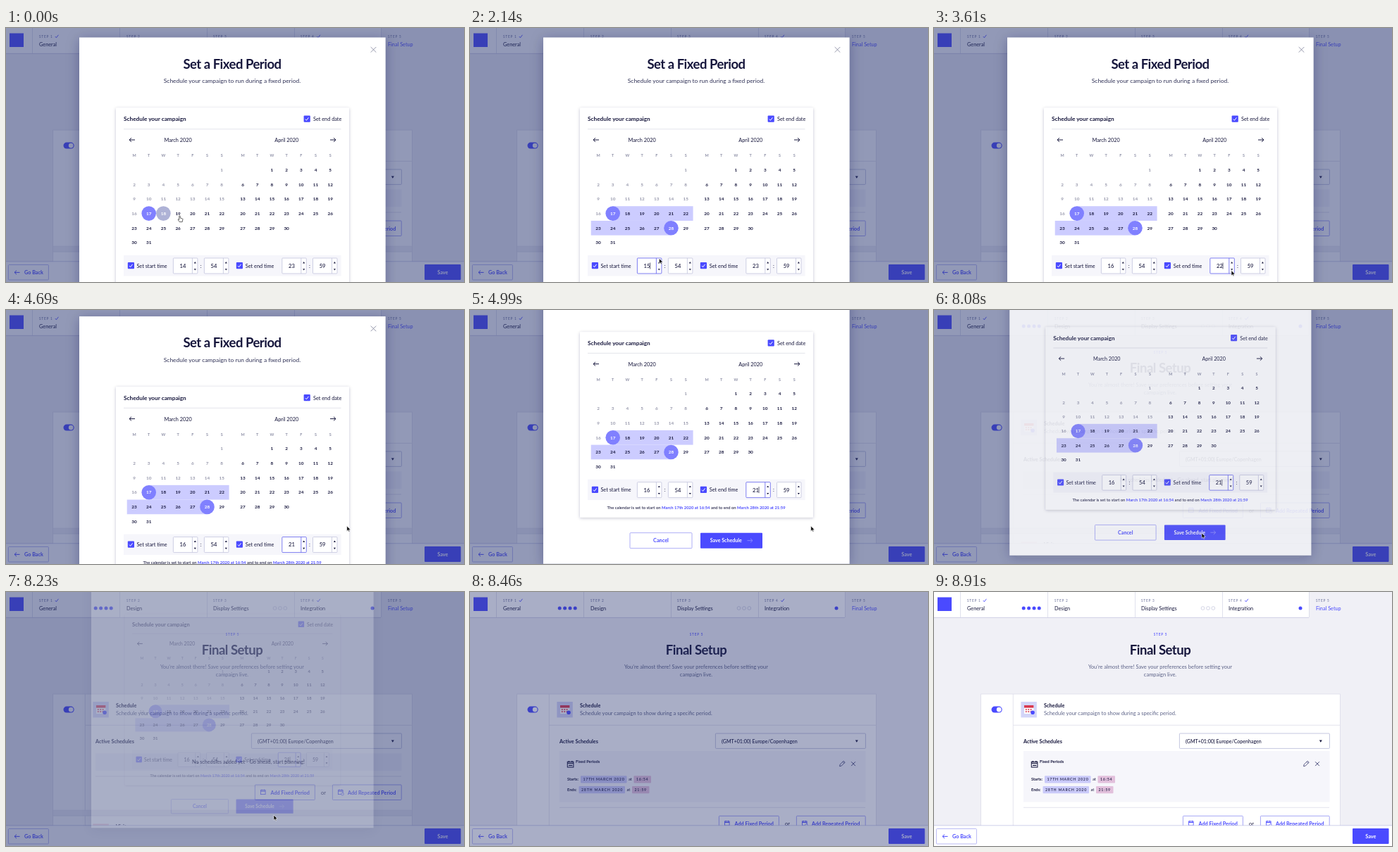
These frames come from a looping animation (650x361 px, 8980 ms). An HTML page:

```html
<!DOCTYPE html>
<html lang="en">
<head>
<meta charset="utf-8">
<title>Schedule a campaign</title>
<style>
  html, body { margin: 0; width: 100%; height: 100%; overflow: hidden; background: #f0f0f6; }
  svg { display: block; width: 650px; height: 361px; font-family: Lato, "Open Sans", sans-serif; }
</style>
</head>
<body>
<svg id="stage" viewBox="0 0 650 361"></svg>
<script>
const LOOP = 8980, BLUE = '#4a4aff', INK = '#16163c', GREY = '#9697ab', SOFT = '#5d6388';
const CELL = 20.7, MAX_SCROLL = 91;

// ---- drawing helpers ----
// y is the vertical middle of the capitals
const text = (x, y, s, { size = 7.3, w = 400, fill = INK, at = 'start', ls = 0 } = {}) =>
  `<text x="${x}" y="${y + size * .36}" font-size="${size}" font-weight="${w}" fill="${fill}" text-anchor="${at}" letter-spacing="${ls}">${s}</text>`;
const mid = (x, y, s, o = {}) => text(x, y, s, { ...o, at: 'middle' });
const bold = (x, y, s, o = {}) => text(x, y, s, { size: 7.25, w: 700, ...o });
const rect = (x, y, w, h, fill, stroke = 'none', rx = 0) =>
  `<rect x="${x}" y="${y}" width="${w}" height="${h}" fill="${fill}" stroke="${stroke}" stroke-width=".8" rx="${rx}"/>`;
const line = (d, stroke, w = .8) => `<path d="${d}" fill="none" stroke="${stroke}" stroke-width="${w}"/>`;
const shape = (d, fill) => `<path d="${d}" fill="${fill}"/>`;
const dot = (x, y, r, fill, stroke = 'none') =>
  `<circle cx="${x}" cy="${y}" r="${r}" fill="${fill}" stroke="${stroke}" stroke-width=".6"/>`;
const arrow = (x, y, dir, color, len = 8) =>
  line(`M${x} ${y}h${dir * len}m${-dir * 3} -2.8l${dir * 3} 2.8l${-dir * 3} 2.8`, color, 1);
const cross = (x, y, r, color) => line(`M${x - r} ${y - r}l${2 * r} ${2 * r}m0 ${-2 * r}l${-2 * r} ${2 * r}`, color, .9);
const tick = (x, y, color, w = 1) => line(`M${x - 2.2} ${y}l1.6 1.8l3 -4`, color, w);
const checkbox = (x, y) => rect(x, y, 9.2, 9.2, BLUE, 'none', 1) + tick(x + 4.4, y + 5, '#fff');
const step = (x, y, n, fill, at) => text(x, y, `STEP ${n}`, { size: 4.7, w: 500, fill, at, ls: .8 });
const shadow = (id, blur, dy, opacity) =>
  `<filter id="${id}" x="-20%" y="-20%" width="140%" height="140%"><feDropShadow dx="0" dy="${dy}" stdDeviation="${blur}" flood-color="#20204a" flood-opacity="${opacity}"/></filter>`;

// ---- page ----
function header() {
  const names = ['General', 'Design', 'Display Settings', 'Integration', 'Final Setup'];
  const lefts = [47, 171, 294, 418, 542];
  return rect(0, 0, 532, 36, '#fff') + line('M0 36.4H532', '#c9cae2') +
    [37.5, 161.5, 285.5, 409.5, 532.5].map(x => line(`M${x} 0V36`, '#d9dae9')).join('') +
    rect(5, 7.5, 20, 19.5, BLUE) +
    names.map((s, i) => step(lefts[i], 12, i + 1, '#7278a0') + text(lefts[i], 23, s, { fill: i == 4 ? BLUE : INK })).join('') +
    tick(72, 12, BLUE, .9) + tick(443.5, 12, BLUE, .9) +
    [127.2, 134.6, 142, 149.2, 520].map(x => dot(x, 23, 2.5, BLUE)).join('') +
    [381.5, 389, 396.3].map(x => dot(x, 23, 2.4, '#fff', '#b9bbd6')).join('');
}

function footer() {
  return rect(0, 332, 650, 29, '#fff') + line('M0 331.8H650', '#c5c6e6') +
    rect(3.4, 336.5, 57, 21.5, '#fff', '#a9aaf2', 1) + arrow(19.5, 347.4, -1, BLUE, 7.5) +
    bold(26, 347.4, 'Go Back', { fill: BLUE }) +
    rect(594, 336, 51.5, 22, BLUE, 'none', 1) + mid(619.8, 347.4, 'Save', { w: 700, fill: '#fff' });
}

function smallCalendar(x, y, color) {
  return rect(x, y + 1, 6.6, 6, 'none', color) + line(`M${x} ${y + 2.6}h6.6m-5 -2.6v1.6m3.4 -1.6v1.6`, color, 1);
}

function pageButtons() {
  return line('M127 262H561', '#dcdde9') +
    rect(353.4, 274, 85, 21.5, '#fff', '#8f90f4', 1) + rect(463.4, 274, 97.8, 21.5, '#fff', '#8f90f4', 1) +
    smallCalendar(361.5, 280.6, BLUE) + smallCalendar(471.5, 280.6, BLUE) + dot(477.5, 287.2, 1.8, '#fff', BLUE) +
    bold(375.5, 285, 'Add Fixed Period', { fill: BLUE }) + bold(485, 285, 'Add Repeated Period', { fill: BLUE }) +
    mid(450.5, 285, 'or') +
    line('M67 310.3H576', '#dcdde9') + rect(67, 310.5, 509, 7.5, '#f0f0f6') + line('M67 318H576', '#dcdde9') +
    rect(123.4, 329.5, 22.4, 22.4, '#f3cfdc') + bold(156, 333, 'Visitors');
}

function periodRow(y, label, x, date, time) {
  const tag = { size: 5.3, w: 500, ls: .75 };
  return bold(138, y, label, { size: 5.6 }) + rect(x, y - 5, 65.5, 10.2, '#cacaf9', 'none', 1) + text(x + 3.5, y, date, tag) +
    text(x + 68, y, 'at', { size: 5.8 }) + rect(x + 75.5, y - 5, 24.5, 10.2, '#e2c0dc', 'none', 1) + text(x + 79, y, time, tag);
}

function page() {
  const red = '#d8384f';
  return rect(0, 0, 650, 361, '#f0f0f6') +
    step(321.5, 60.8, 5, BLUE, 'middle') +
    mid(321, 82, 'Final Setup', { size: 18.5, w: 700, ls: -.5 }) +
    mid(321, 106, 'You’re almost there! Save your preferences before setting your', { size: 7.5, fill: SOFT }) +
    mid(321, 117.5, 'campaign live.', { size: 7.5, fill: SOFT }) +
    rect(66.6, 145, 509.8, 260, '#fff', '#dcdde9') + line('M112.3 145V361M112.3 189.3H576', '#dcdde9') +
    rect(81.5, 162.6, 15.2, 9, BLUE, 'none', 4.5) + dot(92.2, 167.1, 3.4, '#fff') +
    rect(123.4, 156, 22.4, 22.4, '#d3d5f8') + rect(128, 161, 13.4, 12, '#fff') + rect(128, 161, 13.4, 3.6, red) +
    [0, 1, 2, 3, 4, 5].map(i => rect(129.8 + i % 3 * 3.4, 166.3 + (i > 2) * 3, 2, 1.6, red)).join('') +
    dot(140, 171.3, 2.8, BLUE) +
    bold(156, 161.5, 'Schedule') +
    text(156, 172.3, 'Schedule your campaign to show during a specific period.', { size: 7.5, fill: SOFT }) +
    bold(127, 212, 'Active Schedules') +
    rect(348.4, 201, 213, 21.4, '#fff', '#b7b9d8', 1) + text(357, 212, '(GMT+01:00) Europe/Copenhagen', { size: 7.05, w: 500 }) +
    shape('M546.8 210.4h4l-2 3.4z', INK) +
    `<g id="empty">${rect(127, 229.5, 434.5, 24.5, '#f6f6fb')}${mid(344, 241.6, 'No schedules added yet - Go ahead, start planning!', { size: 7.2 })}</g>` +
    `<g id="added">${rect(127, 226, 434.5, 72.5, '#f6f6fb')}` +
      `<g transform="translate(-40.6 -44) scale(1.3)">${smallCalendar(137.6, 218.4, INK)}${line('M139 223.4h4', INK, 1)}</g>` +
      bold(150, 241.3, 'Fixed Periods', { size: 5.7 }) +
      line('M524.6 247.7l.6 -2.6l5 -5l2 2l-5 5zM529 241.4l2 2', '#34376b') + cross(544, 244.2, 2.9, '#34376b') +
      periodRow(266.2, 'Starts:', 157, '17TH MARCH 2020', '16:54') + periodRow(281, 'Ends:', 154.5, '28TH MARCH 2020', '21:59') +
    '</g>' +
    `<g id="below">${pageButtons()}</g>` + header() + footer();
}

// ---- modal ----
const WEEK = [...'MTWTFSS'];
const cellAt = (x0, first, day) => {
  const i = day + first - 1;
  return [x0 + CELL * (i % 7), 201.5 + CELL * Math.floor(i / 7)];
};

function month(x0, first, count, colorOf) {
  return Array.from({ length: count }, (_, i) =>
    mid(...cellAt(x0, first, i + 1), i + 1, { size: 6.4, w: 700, fill: colorOf(i + 1) })).join('');
}

function march(end, chosen) {
  const half = CELL / 2, at = d => cellAt(182, 6, d);
  const bar = (a, b, y) => rect(a, y - half, b - a, CELL, '#ccccff');
  const [x, y] = at(end), [sx, sy] = at(17);
  let back = '';
  if (end > 22) back = bar(sx, 316.6, sy) + bar(171.7, x, y);
  else if (end > 18) back = bar(sx, x, sy);
  return back + dot(sx, sy, 10.3, '#8080ff') + dot(x, y, 10.3, chosen ? '#8080ff' : '#aeb2d6') +
    month(182, 6, 31, d => d == 17 || d == end ? '#fff' : d < 17 ? GREY : INK);
}

function input(i, x) {
  return `<g id="in${i}" stroke="#c3c5dd">${rect(x, 327, 34.5, 22, '#fff', 'inherit', 1)}<path d="M${x + 27} 327v22" stroke-width=".8"/></g>` +
    shape(`M${x + 29.4} 334.4h3l-1.5 -2.4zM${x + 29.4} 342.2h3l-1.5 2.4z`, INK) +
    `<text id="num${i}" x="${x + 13.6}" y="340.9" font-size="7.6" font-weight="500" text-anchor="middle" fill="${INK}"></text>`;
}

function modal() {
  const heads = x0 => WEEK.map((s, i) => mid(x0 + CELL * i, 181, s, { size: 5.5, w: 700, fill: '#8d8fa6' })).join('');
  return `<g filter="url(#glow)">${rect(104, 13.5, 434.6, 429.5, '#fff')}</g>` + cross(521.5, 30.8, 3.8, '#8b8da3') +
    mid(321, 51, 'Set a Fixed Period', { size: 18.5, w: 700, ls: -.5 }) +
    mid(321, 75, 'Schedule your campaign to run during a fixed period.', { size: 8.45, fill: '#2f3156' }) +
    `<g filter="url(#lift)">${rect(156, 113.5, 331, 263.5, '#fff', 'none', 1)}</g>` +
    bold(167, 129.5, 'Schedule your campaign', { size: 8.25 }) +
    checkbox(422.6, 124.5) + text(436, 129.5, 'Set end date') + line('M167 143.7H475.5', '#dcdde6') +
    arrow(183, 159, -1, INK) + arrow(460, 159, 1, INK) + mid(244.1, 159.5, 'March 2020') + mid(398.3, 159.5, 'April 2020') +
    heads(182) + heads(336) + '<g id="march"></g>' + month(336, 2, 30, () => INK) +
    rect(167, 323, 308.5, 29.5, '#f6f6fb') +
    checkbox(172.8, 333) + text(185.4, 338, 'Set start time') + checkbox(326.8, 333) + text(339.8, 338, 'Set end time') +
    [237.4, 281.4, 391.8, 435.5].map((x, i) => input(i, x)).join('') + mid(276.7, 338, ':') + mid(431, 338, ':') +
    `<path id="caret" stroke="${INK}" stroke-width=".7"/>` +
    `<text id="summary" x="321" y="365" font-size="5.87" font-weight="500" text-anchor="middle" fill="${INK}"></text>` +
    rect(227, 399, 88, 22, '#fff', '#9a9bf5', 1) + mid(271, 410, 'Cancel', { w: 700, fill: BLUE }) +
    `<g id="save" fill="${BLUE}">${rect(327, 399, 88, 22, 'inherit', 'none', 1)}</g>` +
    bold(340.7, 410, 'Save Schedule', { size: 7.1, fill: '#fff' }) + arrow(393.5, 410, 1, '#8585ff', 7.5);
}

const pointers = `<g id="cursor" stroke="#fff" stroke-width=".6" stroke-linejoin="round">
  <path id="tip" d="M0 0V7.4L1.7 5.8L2.8 8.3L4 7.8L2.9 5.4H5.2Z" fill="#000"/>
  <path id="hand" d="M-.7 .2Q0 -.6 .7 .2V3L3.9 3.9Q4.5 4.2 4.4 5L3.7 8.6H-.2L-2.5 5.3Q-2.2 4.2 -.7 5.4Z" fill="#fff" stroke="#000"/></g>`;

const $ = id => document.getElementById(id);
$('stage').innerHTML = `<defs>${shadow('lift', 2, 1, .25)}${shadow('glow', 9, 3, .3)}</defs>` +
  page() + '<rect id="shade" width="650" height="361" fill="rgb(38,52,112)"/>' + `<g id="modal">${modal()}</g>` + pointers;

// ---- motion ----
const CLICK_DAY = 1300, FOCUS = 2000, FOCUS_END = 3450, SWAP = 8450;
const cursorPath = [[0, 246.5, 267], [700, 284, 267], [950, 288, 271], [1150, 286, 285], [1400, 286, 285], [1850, 268.5, 327.5],
  [2650, 268.5, 327.5], [3250, 422, 344.5], [4150, 422, 344.5], [4650, 483.8, 307], [5610, 483.8, 307], [6400, 380, 317]];
const hovers = [[0, 18], [80, 19], [350, 20], [650, 21], [1050, 28]];
const startHours = [[0, 14], [FOCUS, 15], [2450, 16]];
const endHours = [[0, 23], [FOCUS_END, 22], [3950, 21]];

const latest = (keys, t) => keys.filter(k => k[0] <= t).pop();
const clamp = (t, a, b) => Math.min(1, Math.max(0, (t - a) / (b - a)));
const smooth = p => p * p * (3 - 2 * p);
const show = (id, on) => $(id).setAttribute('display', on ? 'inline' : 'none');

function cursorAt(t) {
  const i = cursorPath.findIndex(k => k[0] > t);
  if (i < 0) return cursorPath.at(-1).slice(1);
  const [a, b] = [cursorPath[i - 1], cursorPath[i]], p = smooth(clamp(t, a[0], b[0]));
  return [1, 2].map(k => a[k] + (b[k] - a[k]) * p);
}

let lastDates = '', lastSummary = '';
function draw(t) {
  const day = latest(hovers, t)[1], chosen = t >= CLICK_DAY;
  if (lastDates != day + '/' + chosen) {
    lastDates = day + '/' + chosen;
    $('march').innerHTML = march(day, chosen);
  }

  const from = latest(startHours, t), to = latest(endHours, t);
  [from[1], 54, to[1], 59].forEach((n, i) => $('num' + i).textContent = n);
  const focus = t < FOCUS ? -1 : t < FOCUS_END ? 0 : 2;
  for (let i = 0; i < 4; i++) $('in' + i).setAttribute('stroke', i == focus ? '#6060ee' : '#c3c5dd');
  show('caret', focus >= 0 && (t - (focus ? to : from)[0]) % 1000 < 500);
  $('caret').setAttribute('d', `M${focus ? 410 : 255.6} 333.5v9`);

  const when = s => `<tspan fill="${BLUE}" font-weight="700">${s}</tspan>`;
  const summary = 'The calendar is set to start on ' + when(`March 17th 2020 at ${from[1]}:54`) +
    (chosen ? ' and to end on ' + when(`March 28th 2020 at ${to[1]}:59`) : '');
  if (summary != lastSummary) $('summary').innerHTML = lastSummary = summary;

  const scroll = MAX_SCROLL * (1 - (1 - clamp(t, 4680, 5130)) ** 2);
  const out = smooth(clamp(t, 8000, 8330)), k = 1 - .1 * out;
  $('modal').setAttribute('transform', `translate(321.3 137) scale(${k}) translate(-321.3 ${-137 - scroll})`);
  $('modal').setAttribute('opacity', 1 - out);
  show('modal', out < 1);
  $('shade').setAttribute('opacity', .5 * (1 - smooth(clamp(t, 8300, 8850))));

  const added = t >= SWAP;
  show('empty', !added);
  show('added', added);
  $('below').setAttribute('transform', `translate(0 ${added ? 44.3 : 0})`);

  const [x, y] = cursorAt(t), overSave = t > 6250 && t < 8050, hand = t < 1500 || overSave;
  $('save').setAttribute('fill', overSave ? '#3636d8' : BLUE);
  $('cursor').setAttribute('transform', `translate(${x} ${y})`);
  show('cursor', t < SWAP);
  show('hand', hand);
  show('tip', !hand);
}

const begin = performance.now();
function tickFrame() {
  draw((performance.now() - begin) % LOOP);
  requestAnimationFrame(tickFrame);
}
tickFrame();
</script>
</body>
</html>
```
